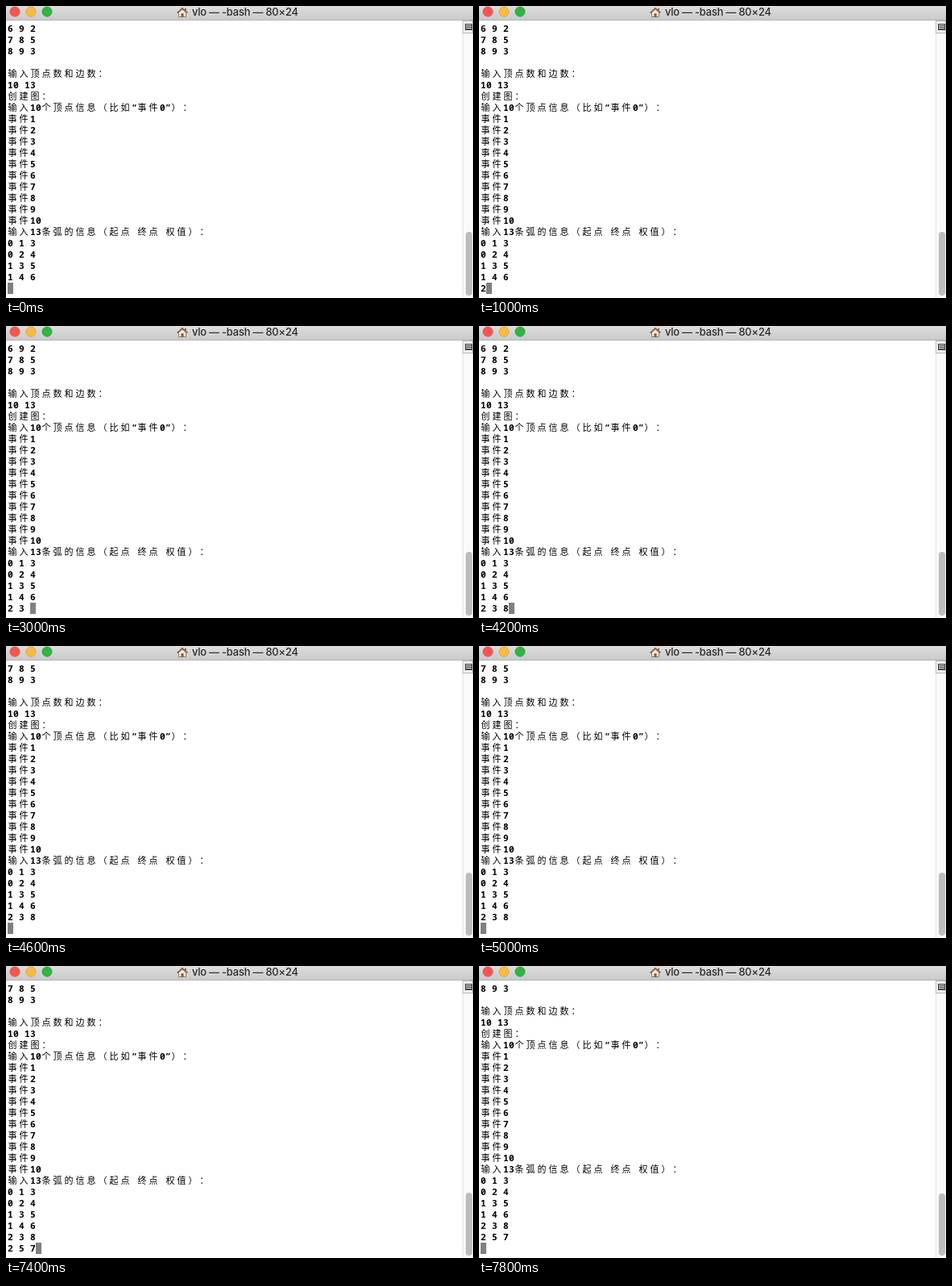
Recreate the animation shown at these times as an HTML page. Size 580x362 px, loop 8 s.

```html
<!DOCTYPE html>
<html lang="zh-CN">
<head>
<meta charset="utf-8">
<style>
  html, body { margin: 0; width: 100%; height: 100%; overflow: hidden; background: #fff; }
  svg { display: block; }
  .title { font: 500 13px Inter, Roboto, sans-serif; letter-spacing: -0.25px; fill: #2c2c2c; }
  .mono { font: 600 11.2px "Noto Sans Mono", "DejaVu Sans Mono", monospace; fill: #000; }
  .wide { font: 500 11px "Noto Sans CJK SC", "Noto Sans CJK", "Noto Sans CJK JP", sans-serif; }
</style>
</head>
<body>
<svg width="580" height="362" viewBox="0 0 580 362">
  <defs>
    <linearGradient id="bar" x2="0" y2="1">
      <stop offset="0" stop-color="#dedede"/>
      <stop offset="1" stop-color="#c9c9c9"/>
    </linearGradient>
  </defs>
  <rect width="580" height="362" fill="#fff"/>
  <rect width="580" height="18" fill="url(#bar)"/>
  <rect y="17" width="580" height="1" fill="#b4b4b4"/>
  <g stroke-width=".7">
    <circle cx="11" cy="7" r="6.1" fill="#fb5550" stroke="#cf4540"/>
    <circle cx="31" cy="7" r="6.1" fill="#fdbb3d" stroke="#cf9a38"/>
    <circle cx="51" cy="7" r="6.1" fill="#2fb640" stroke="#2a9238"/>
  </g>
  <g>
    <path d="M214.5 8L219 4L223.5 8V13.5H214.5Z" fill="#f2ece2" stroke="#857259" stroke-width=".9"/>
    <path d="M222 3h1.8v4l-1.8-2z" fill="#8a5936"/>
    <path d="M212.6 8.6L219 2.8L225.4 8.6" fill="none" stroke="#935d38" stroke-width="1.5"/>
    <rect x="217.4" y="9.2" width="3.2" height="4.3" fill="#84603f"/>
  </g>
  <text class="title" x="231" y="12">vlo — -bash — 80×24</text>
  <rect x="567" y="18" width="13" height="344" fill="#fafafa"/>
  <rect x="567" y="18" width="1" height="344" fill="#e3e3e3"/>
  <rect x="567.5" y="18.5" width="12" height="15" fill="#f4f4f4" stroke="#b8b8b8"/>
  <rect x="570.5" y="22.5" width="8" height="7" fill="#ccc" stroke="#444"/>
  <path d="M571 24.5h7M571 26.5h7M571 28.5h7" stroke="#555"/>
  <rect id="thumb" x="571" width="8" rx="4" fill="#bcbcbc"/>
  <rect id="cursor" y="343" width="7" height="14" fill="#808080"/>
  <g id="screen"></g>
</svg>
<script>
  const LOOP = 8000, ROWS = 24, CELL = 7, LINE = 14, LEFT = 2, TOP = 21;
  const history = [
    "6 9 2", "7 8 5", "8 9 3", "",
    "输入顶点数和边数：", "10 13", "创建图：",
    "输入10个顶点信息（比如“事件0”）：",
    ...Array.from({ length: 10 }, (_, i) => "事件" + (i + 1)),
    "输入13条弧的信息（起点 终点 权值）：",
    "0 1 3", "0 2 4", "1 3 5", "1 4 6"
  ];
  // [time in ms, text typed so far]
  const typing = [
    [0, ""], [1000, "2"], [1200, "2 "], [2000, "2 3"], [2400, "2 3 "], [4200, "2 3 8"],
    [4600, "2 3 8\n"], [6400, "2 3 8\n2"], [6600, "2 3 8\n2 "], [7000, "2 3 8\n2 5 "],
    [7400, "2 3 8\n2 5 7"], [7800, "2 3 8\n2 5 7\n"]
  ];
  const byId = id => document.getElementById(id);
  const screen = byId("screen"), cursor = byId("cursor"), thumb = byId("thumb");
  const isWide = ch => ch >= "\u2e80";

  function lineMarkup(text, row) {
    let x = LEFT, spans = "";
    for (const ch of text) {
      const wide = isWide(ch);
      if (ch !== " ") {
        spans += `<tspan x="${x + (wide ? 0.4 : 0.1)}"${wide ? ' class="wide"' : ""}>${ch}</tspan>`;
      }
      x += wide ? 2 * CELL : CELL;
    }
    return `<text class="mono" y="${TOP + row * LINE + 11}">${spans}</text>`;
  }

  let shown = null;
  function draw(time) {
    const typed = typing.findLast(([start]) => start <= time)[1];
    if (typed === shown) return;
    shown = typed;
    const lines = [...history, ...typed.split("\n")];
    const scroll = lines.length - ROWS;
    screen.innerHTML = lines.slice(-ROWS).map(lineMarkup).join("");
    cursor.setAttribute("x", LEFT + lines.at(-1).length * CELL);
    thumb.setAttribute("y", 280 + scroll);
    thumb.setAttribute("height", 79 - scroll);
  }

  const begin = performance.now();
  function tick() {
    draw((performance.now() - begin) % LOOP);
    requestAnimationFrame(tick);
  }
  tick();
</script>
</body>
</html>
```
